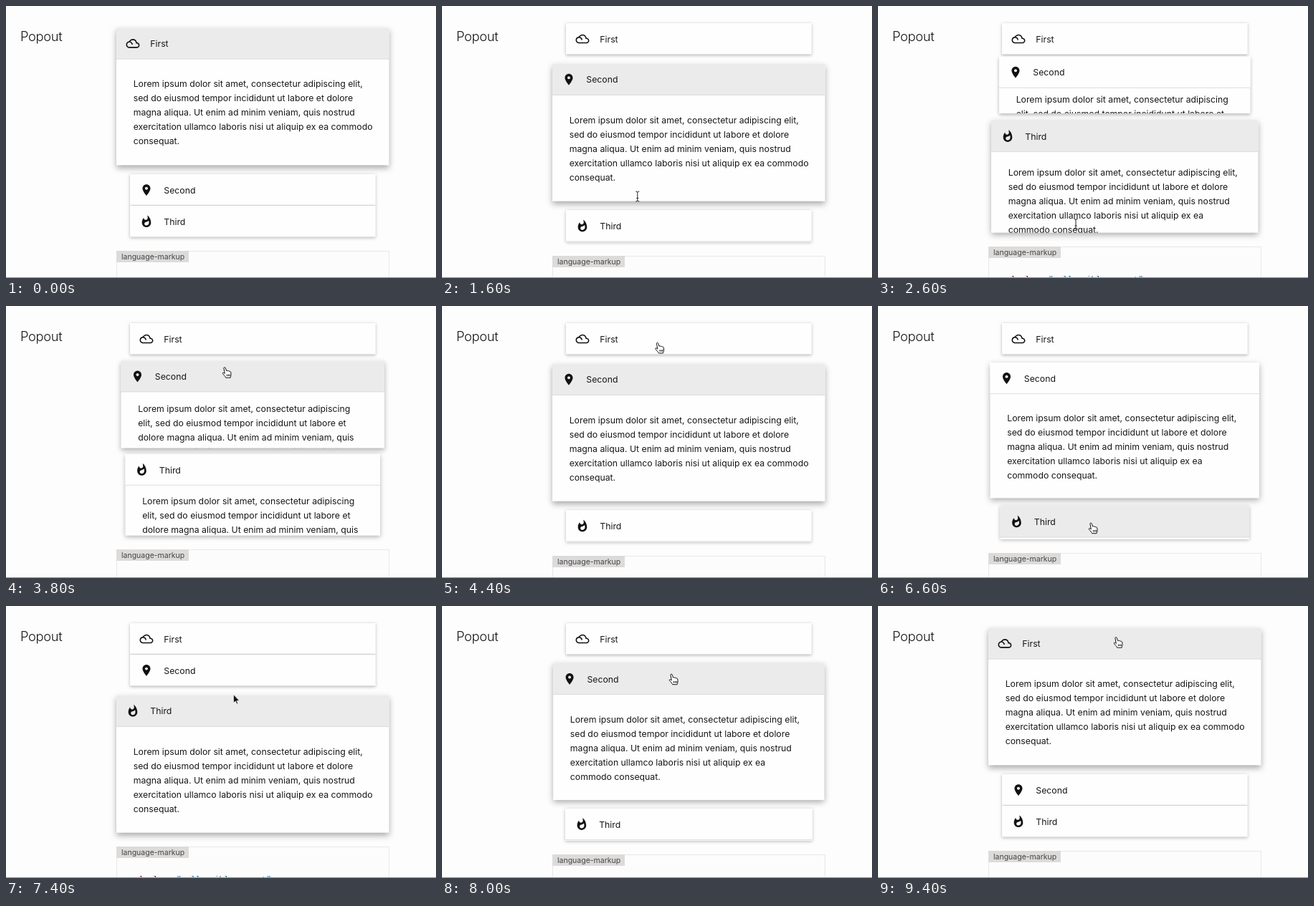
These frames come from a looping animation (600 px wide and 380 px high, 9.8 s). An HTML page:

```html
<!DOCTYPE html>
<html lang="en">
<head>
<meta charset="utf-8">
<title>Popout</title>
<style>
html, body { margin: 0; width: 100%; height: 100%; overflow: hidden; background: #fdfdfd; }
svg { display: block; }
text { font-family: Inter, "Open Sans", sans-serif; font-size: 12.27px; fill: #181818; white-space: pre; }
.title { font-size: 18.3px; font-weight: 300; letter-spacing: -.3px; }
.tag { font-size: 10.5px; fill: #444; }
.code { font-family: "Liberation Mono", "DejaVu Sans Mono", monospace; font-size: 11px; }
</style>
</head>
<body>
<svg id="stage" width="600" height="380" viewBox="0 0 600 380">
  <text class="title" x="20" y="49.4">Popout</text>
  <g id="pre">
    <rect x="154.5" y=".5" width="380" height="80" fill="#fcfcfc" stroke="#e8e8e8"/>
    <rect x="154" y="0" width="101" height="16" fill="#dddbda"/>
    <text class="tag" x="161" y="11.6">language-markup</text>
    <text class="code" x="172" y="49"><tspan fill="#999">&lt;</tspan><tspan fill="#905">ul class=</tspan><tspan fill="#07a">"collapsible popout"</tspan><tspan fill="#999">&gt;</tspan></text>
  </g>
  <g id="list"></g>
  <rect y="379" width="600" height="1" fill="#8c8c8c"/>
  <g id="cursor">
    <path id="hand" fill="#fff" stroke="#111" stroke-linejoin="round" d="M-1.6 .6C-1.6-.6.4-.8.8.6L2 4.6C2.6 3.8 4 4 4.2 5 4.9 4.3 6 4.6 6.2 5.5 7 5 8 5.4 8.2 6.4L8.6 9.4C8.7 11 8 12 7.6 14.2H1.2C.6 12.4-1.4 10.6-3 8.6-3.8 7.4-2.4 6.6-1.4 7.4L-.2 8.4ZM3 9.5V12M5 9.5V12M6.8 9.5V12"/>
    <path id="beam" fill="none" stroke="#222" d="M-2.5-6.5Q0-6.5 0-5Q0-6.5 2.5-6.5M0-5V6M-2.5 7.5Q0 7.5 0 6Q0 7.5 2.5 7.5M-1.5 3H1.5"/>
    <path id="arrow" fill="#111" stroke="#fff" stroke-width=".8" d="M0 0V12L2.8 9.4 4.6 13.4 6.4 12.6 4.7 8.8H8.4Z"/>
  </g>
</svg>
<script>
const LOOP = 9800, STEP = 200, SLIDE = 350;
const TOP = 24, HEAD = 44, BODY = 148, GAP = 12.7, PAD = 24.5;

const NAMES = ["First", "Second", "Third"];
const ICONS = [
  "M19.35 10.04C18.67 6.59 15.64 4 12 4 9.11 4 6.61 5.64 5.36 8.04 2.35 8.36 0 10.9 0 14c0 3.31 2.69 6 6 6h13c2.76 0 5-2.24 5-5 0-2.64-2.05-4.78-4.65-4.96zM19 18H6c-2.21 0-4-1.79-4-4s1.79-4 4-4 4 1.79 4 4h2c0-2.76-1.86-5.08-4.4-5.78C8.61 6.88 10.2 6 12 6c3.03 0 5.5 2.47 5.5 5.5v.5H19c1.65 0 3 1.35 3 3s-1.35 3-3 3z",
  "M12 2C8.13 2 5 5.13 5 9c0 5.25 7 13 7 13s7-7.75 7-13c0-3.87-3.13-7-7-7zm0 9.5c-1.38 0-2.5-1.12-2.5-2.5s1.12-2.5 2.5-2.5 2.5 1.12 2.5 2.5-1.12 2.5-2.5 2.5z",
  "M13.5.67s.74 2.65.74 4.8c0 2.06-1.35 3.73-3.41 3.73-2.07 0-3.63-1.67-3.63-3.73l.03-.36C5.21 7.51 4 10.62 4 14c0 4.42 3.58 8 8 8s8-3.58 8-8C20 8.61 17.41 3.8 13.5.67zM11.71 19c-1.78 0-3.22-1.4-3.22-3.14 0-1.62 1.05-2.76 2.81-3.12 1.77-.36 3.6-1.21 4.62-2.58.39 1.29.59 2.65.59 4.04 0 2.65-2.15 4.8-4.8 4.8z"
];

// Line breaks for the wide, medium and narrow panel.
const WRAPS = [
  "Lorem ipsum dolor sit amet, consectetur adipiscing elit,|sed do eiusmod tempor incididunt ut labore et dolore|magna aliqua. Ut enim ad minim veniam, quis nostrud|exercitation ullamco laboris nisi ut aliquip ex ea commodo|consequat.",
  "Lorem ipsum dolor sit amet, consectetur adipiscing elit,|sed do eiusmod tempor incididunt ut labore et dolore|magna aliqua. Ut enim ad minim veniam, quis nostrud|exercitation ullamco laboris nisi ut aliquip ex ea|commodo consequat.",
  "Lorem ipsum dolor sit amet, consectetur adipiscing|elit, sed do eiusmod tempor incididunt ut labore et|dolore magna aliqua. Ut enim ad minim veniam, quis|nostrud exercitation ullamco laboris nisi ut aliquip|ex ea commodo consequat."
].map(s => s.split("|"));

// [time, item opened]
const CLICKS = [[-SLIDE, 0], [1080, 1], [2411, 2], [3655, 1], [4720, 0],
  [5500, 1], [6576, 2], [7734, 1], [8985, 0]];

// [time, x, y] of the pointer's hot spot
const MOVES = [[500, 262, 396], [950, 272, 256], [1400, 272, 256], [2100, 276, 304],
  [2700, 276, 304], [3400, 305.5, 86], [4000, 305.5, 86], [4550, 300, 44],
  [4850, 300, 44], [5350, 295.5, 248.5], [5800, 295.5, 248.5], [6450, 297.5, 303.5],
  [6900, 297.5, 303.5], [7550, 320.5, 95.5], [8150, 320.5, 95.5], [8800, 332.5, 44],
  [LOOP, 332.5, 44]];

const $ = id => document.getElementById(id);
const mix = (a, b, k) => a + (b - a) * k;

function make(parent, tag, attrs = {}) {
  const el = document.createElementNS("http://www.w3.org/2000/svg", tag);
  set(el, attrs);
  return parent.appendChild(el);
}
function set(el, attrs) {
  for (const key in attrs) el.setAttribute(key, attrs[key]);
}

const items = NAMES.map((name, i) => {
  const g = make($("list"), "g");
  const card = make(g, "rect", { fill: "#fefefe" });
  const head = make(g, "rect", { height: HEAD });
  const rule = make(g, "rect", { height: 1, fill: "#ddd" });
  const label = make(g, "g");
  make(label, "path", { d: ICONS[i], fill: "#111", transform: "translate(13.5 12.5) scale(.79)" });
  make(label, "text", { x: 47.3, y: 26.8 }).textContent = name;
  const body = make(g, "svg");
  const lines = WRAPS[0].map(() => make(body, "text", { x: 23.7 }));
  return { card, head, rule, label, body, lines };
});

function drawItem(it, y, m, b, focused) {
  const x = mix(173, 154, m), width = mix(342.5, 380.5, m), h = BODY * b;
  set(it.card, { x, y, width, height: HEAD + h });
  it.card.style.filter =
    `drop-shadow(0 ${mix(1.6, 4, m)}px ${mix(2.2, 4.5, m)}px rgba(0,0,0,${mix(.28, .33, m)}))`;
  set(it.head, { x, y, width, fill: focused ? "#ebebeb" : "#fefefe" });
  set(it.rule, { x, y: y + HEAD - 1, width });
  set(it.label, { transform: `translate(${x} ${y})` });
  set(it.body, { x, y: y + HEAD, width, height: h, visibility: h > 0 ? "visible" : "hidden" });
  const wrap = WRAPS[m > .98 ? 0 : m > .72 ? 1 : 2];
  it.lines.forEach((line, n) => {
    line.textContent = wrap[n];
    set(line, { y: 14.4 + PAD * b + 20 * n });
  });
  return { x, y, right: x + width, bottom: y + HEAD + h };
}

function drawCursor(t, boxes) {
  let k = 0;
  while (k < MOVES.length - 2 && t >= MOVES[k + 1][0]) k++;
  const [t0, x0, y0] = MOVES[k], [t1, x1, y1] = MOVES[k + 1];
  const u = Math.max(0, Math.min(1, (t - t0) / (t1 - t0))), s = u * u * (3 - 2 * u);
  const x = mix(x0, x1, s), y = mix(y0, y1, s);
  const over = boxes.find(b => x > b.x && x < b.right && y >= b.y && y < b.bottom);
  const kind = !over ? "arrow" : y < over.y + HEAD ? "hand" : "beam";
  for (const id of ["hand", "beam", "arrow"]) $(id).style.display = id === kind ? "" : "none";
  set($("cursor"), { transform: `translate(${x} ${y})`, visibility: t < t0 ? "hidden" : "visible" });
}

function draw(t) {
  let k = CLICKS.length - 1;
  while (CLICKS[k][0] > t) k--;
  const [start, open] = CLICKS[k], last = k ? CLICKS[k - 1][1] : -1;
  const u = Math.min(1, (t - start) / SLIDE);
  const margin = 1 - (1 - u) ** 2;
  const slide = .5 - .5 * Math.cos(Math.PI * Math.min(1, u / .8));
  const part = (i, p) => i === open ? p : i === last ? 1 - p : 0;

  let y = TOP, prev = 0;
  const boxes = items.map((it, i) => {
    const m = part(i, margin);
    y += i ? Math.max(prev, m) * GAP : Math.max(0, m * GAP - 6.3);
    prev = m;
    const box = drawItem(it, y, m, part(i, slide), i === open);
    y = box.bottom;
    return box;
  });
  set($("pre"), { transform: `translate(0 ${Math.round(y + 19.2)})` });
  drawCursor(t, boxes);
}

const begin = performance.now();
function tick() {
  const t = (performance.now() - begin) % LOOP;
  draw(Math.min(LOOP - 2 * STEP, Math.floor(t / STEP) * STEP));
  requestAnimationFrame(tick);
}
tick();
</script>
</body>
</html>
```
